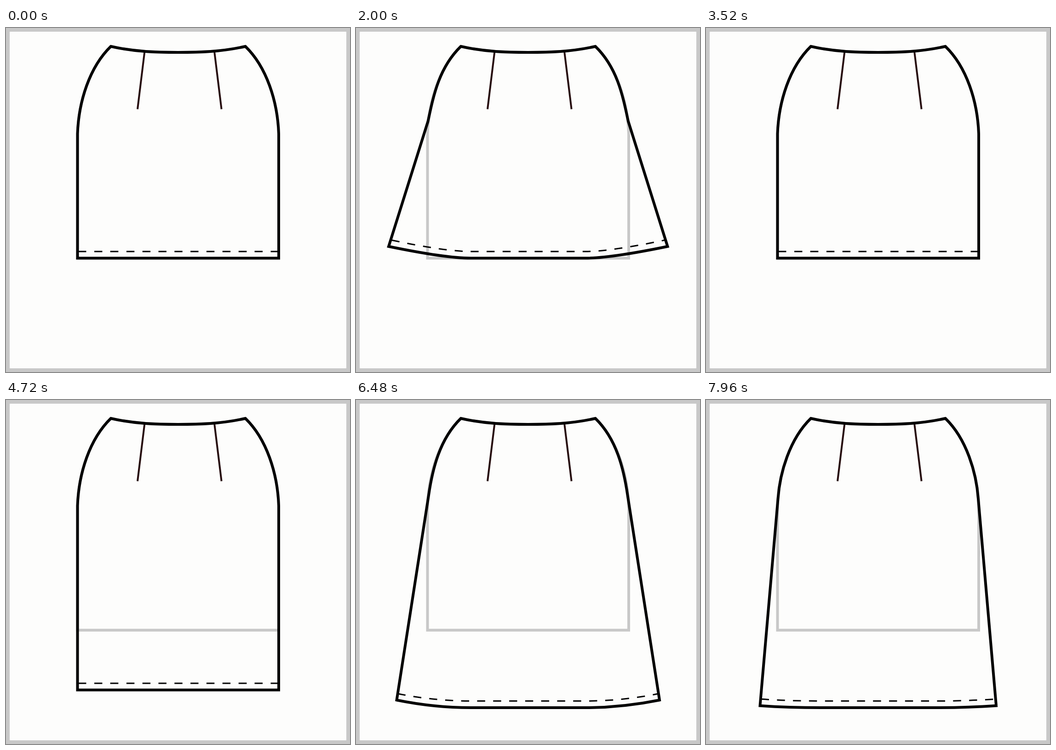
An HTML page that plays this animation: 748x748 px, repeating every 8000 ms.

```html
<!DOCTYPE html>
<html lang="en">
<head>
<meta charset="utf-8">
<title>Skirt shapes</title>
<style>
  html, body { margin: 0; width: 100%; height: 100%; overflow: hidden; background: #c8c8c8; }
  svg { display: block; width: 748px; height: 748px; }
  path { fill: none; stroke: #000; stroke-width: 6; }
  #ghost { stroke: #c8c8c8; }
  #darts { stroke: #260c0e; stroke-width: 4; }
  #stitch { stroke-width: 3; stroke-dasharray: 17.4 17.4; }
</style>
</head>
<body>
<svg viewBox="0 0 748 748">
  <rect x="8" y="8" width="732" height="732" fill="#fdfdfc"/>
  <path id="ghost"/>
  <path id="darts" d="M301.3 52L286 176.5M453.2 52L468.6 176.5"/>
  <path id="stitch"/>
  <path id="outline"/>
</svg>
<script>
const LOOP = 8000, STEP = 80;
const SHORT = 500.5, LONG = 669, MID = 374.25;

// Pose: curve handle x, y; hip x, y; corner x; corner lift; hem handle x; stitch start x
const straight = [158, 160, 155.5, 230, 155.5, 0, 200, 157.5];
const shortFlare = {
  at: [0, 9, 19],
  poses: [straight,
    [160.5, 153, 156, 220, 113.6, 8.7, 185, 119],
    [169, 144, 156.5, 203, 71, 25.5, 195, 77.2]]
};
const longFlare = {
  at: [0, 10, 17],
  poses: [straight,
    [160.5, 159, 156.5, 215, 117.5, 4.3, 180, 119.7],
    [166, 152, 158, 207, 88.5, 16.5, 170, 90.5]]
};

// Quadratic through the three poses
function flare({ at: [a, b, c], poses: [p, q, r] }, k) {
  const u = (k - b) * (k - c) / ((a - b) * (a - c));
  const v = (k - a) * (k - c) / ((b - a) * (b - c));
  const w = (k - a) * (k - b) / ((c - a) * (c - b));
  return p.map((n, i) => n * u + q[i] * v + r[i] * w);
}

const mirror = x => 2 * MID - x;

function hemPath(x, y, handle, base) {
  return `${x} ${y}Q${handle} ${base} 250 ${base}H${mirror(250)}` +
    `Q${mirror(handle)} ${base} ${mirror(x)} ${y}`;
}

function outlinePath([cx, cy, hx, hy, x, lift, handle], hem) {
  return `M228 40C280 52 330 53 ${MID} 53S${mirror(280)} 52 ${mirror(228)} 40` +
    `C${mirror(181.5)} 85 ${mirror(cx)} ${cy} ${mirror(hx)} ${hy}` +
    `L${mirror(x)} ${hem - lift}M228 40C181.5 85 ${cx} ${cy} ${hx} ${hy}` +
    `L${hemPath(x, hem - lift, handle, hem)}L${mirror(hx)} ${hy}` +
    `C${mirror(cx)} ${cy} ${mirror(181.5)} 85 ${mirror(228)} 40` +
    `C${mirror(280)} 52 ${mirror(330)} 53 ${MID} 53S280 52 228 40Z`;
}

function stitchPath([, , , , , lift, handle, x], hem) {
  const y = hem - 14.5;
  return `M${hemPath(x, y - lift * 0.97, handle, y)}`;
}

// Steps taken since a start time, held at the limit
const steps = (t, start, max) =>
  Math.min(max, Math.max(0, Math.floor((t - start) / STEP) + 1));

function stateAt(t) {
  if (t < 3760) {
    const k = steps(t, 240, 20) - steps(t, 2000, 20);
    return [flare(shortFlare, k), SHORT];
  }
  const hem = SHORT + (LONG - SHORT) * (steps(t, 3760, 16) / 16) ** 1.25;
  const k = steps(t, 5200, 22) - steps(t, 7080, 22);
  return [flare(longFlare, k), hem];
}

const setPath = (id, d) => document.getElementById(id).setAttribute("d", d);

function draw(now) {
  const [pose, hem] = stateAt(now % LOOP);
  setPath("outline", outlinePath(pose, hem));
  setPath("stitch", stitchPath(pose, hem));
}

function tick() {
  draw(performance.now() - begin);
  requestAnimationFrame(tick);
}

setPath("ghost", outlinePath(straight, SHORT));
const begin = performance.now();
tick();
</script>
</body>
</html>
```
